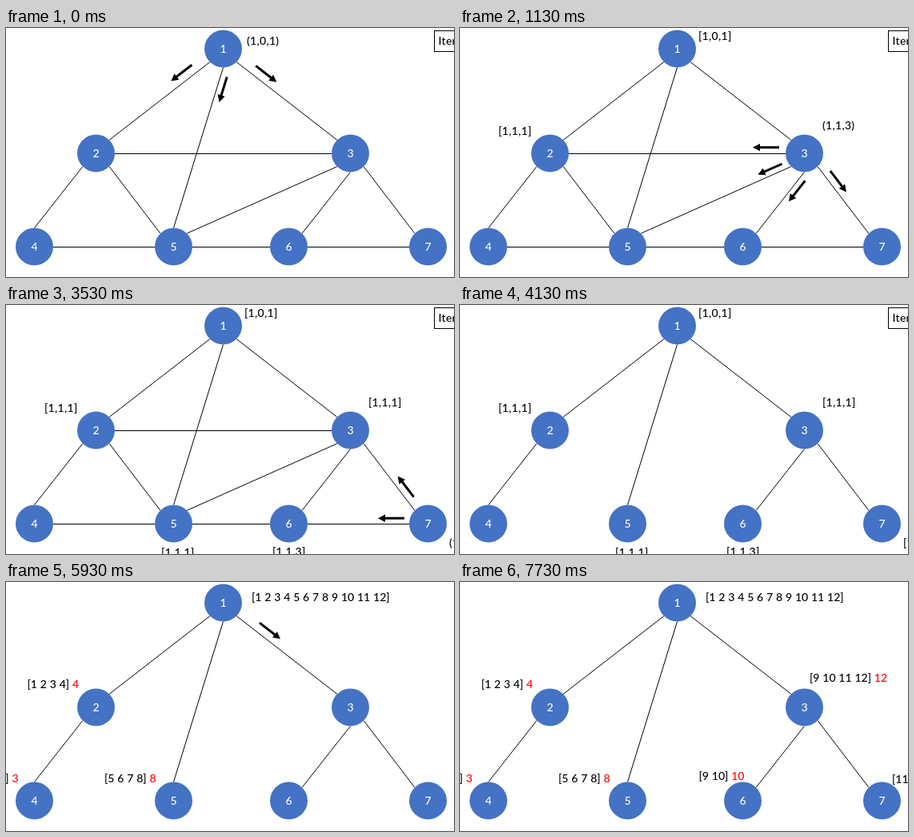
Recreate the animation shown at these times as an HTML page with a canvas. Size 560 by 312 pixels, loop 8.33 s.

```html
<!DOCTYPE html>
<html lang="en">
<head>
<meta charset="utf-8">
<title>Spanning tree numbering</title>
<style>
html, body { margin: 0; width: 100%; height: 100%; overflow: hidden; background: #fff; }
canvas { display: block; }
</style>
</head>
<body>
<canvas id="stage" width="560" height="312"></canvas>
<script>
const ctx = document.getElementById("stage").getContext("2d");
const LOOP = 8330, FIRST = 530, STEP = 600;
const TREE_STEP = 7, LIST_STEP = 8;
const BLUE = "#4472c4", RED = "#ff0000", RADIUS = 23.5;

// note: message offset, nudge: extra offset while active,
// range: numbers held, at: step they appear, tag: their offset
const nodes = [
  { id: 1, x: 271.5, y: 26, note: [26.5, -11], nudge: [3, 6], range: [1, 12], at: 8, tag: [35.5, -2] },
  { id: 2, x: 112.5, y: 157, parent: 1, note: [-64.5, -23], nudge: [6, 0], range: [1, 4], at: 9, tag: [-86, -24] },
  { id: 3, x: 430.5, y: 157, parent: 1, note: [22.5, -30], range: [9, 12], at: 11, tag: [6.5, -32] },
  { id: 4, x: 35.5, y: 274, parent: 2, note: [-78, -23], range: [1, 3], at: 10, tag: [-72.5, -23] },
  { id: 5, x: 209.5, y: 274, parent: 1, note: [-15.5, 41], range: [5, 8], at: 10, tag: [-86.5, -23] },
  { id: 6, x: 353.5, y: 274, parent: 3, note: [-20.5, 40], range: [9, 10], at: 13, tag: [-55, -26] },
  { id: 7, x: 527.5, y: 274, parent: 3, note: [26.5, 29], range: [11, 11], at: 13, tag: [12.5, -22] }
];

// Edges join compass points on the node rims
const compass = ["E", "SE", "S", "SW", "W", "NW", "N", "NE"];
const treeEdges = parseEdges("1SW-2NE 1S-5N 1SE-3NW 2SW-4N 3S-6NE 3SE-7NW");
const crossEdges = parseEdges("2E-3W 2SE-5NW 3SW-5NE 4E-5W 5E-6W 6E-7W");
const edges = [...treeEdges, ...crossEdges];

// Arrows per step: from>to, then + above or - below the edge and the gap to the rim
const arrows = [
  "1>2+20 1>5-10 1>3+22",
  "2>3+8 2>4+14 2>5+8",
  "3>2+8 3>5+9 3>6-8 3>7+14",
  "4>5+9",
  "5>2+5 5>3+4 5>4+7 5>6+7",
  "6>3+8 6>7+7",
  "7>3+14 7>6+6",
  "",
  "1>2+40",
  "2>4+14 1>5+36",
  "1>3+28",
  "",
  "3>6+18 3>7+14",
  ""
].map(parseArrows);

function rim(id, point) {
  const { x, y } = nodes[id - 1], angle = compass.indexOf(point) * Math.PI / 4;
  return { id, x: x + RADIUS * Math.cos(angle), y: y + RADIUS * Math.sin(angle) };
}

function parseEdges(spec) {
  return spec.split(" ").map(edge =>
    edge.split("-").map(end => rim(+end[0], end.slice(1))));
}

function parseArrows(spec) {
  return [...spec.matchAll(/(\d)>(\d)([+-])(\d+)/g)].map(([, from, to, side, gap]) => {
    const edge = edges.find(e => e.some(p => p.id === +from) && e.some(p => p.id === +to));
    const [a, b] = edge[0].id === +from ? edge : [edge[1], edge[0]];
    const angle = Math.atan2(b.y - a.y, b.x - a.x);
    const up = (Math.cos(angle) > 0 ? -1 : 1) * (side === "+" ? 1 : -1);
    return { ...a, angle, gap: +gap, lift: up * Math.min(11, 5 + gap * 0.3) };
  });
}

function line(x1, y1, x2, y2, width = 1) {
  ctx.lineWidth = width;
  ctx.beginPath();
  ctx.moveTo(x1, y1);
  ctx.lineTo(x2, y2);
  ctx.stroke();
}

function drawEdge([a, b]) {
  const snap = a.y === b.y || Math.abs(a.y - b.y) < 0.01 ? 0.5 : 0;
  line(a.x, a.y + snap, b.x, b.y + snap);
}

function drawArrow({ x, y, angle, gap, lift }) {
  const length = 33;
  ctx.save();
  ctx.translate(x, y);
  ctx.rotate(angle);
  ctx.translate(gap, lift);
  ctx.fillStyle = "#000";
  line(0, 0, length - 8, 0, 3);
  ctx.beginPath();
  ctx.moveTo(length, 0);
  ctx.lineTo(length - 9, -4.7);
  ctx.lineTo(length - 9, 4.7);
  ctx.fill();
  ctx.restore();
}

function text(str, x, y, color = "#000") {
  ctx.fillStyle = color;
  ctx.fillText(str, x, y);
}

function drawNode({ id, x, y }) {
  ctx.fillStyle = BLUE;
  ctx.beginPath();
  ctx.arc(x, y, RADIUS, 0, Math.PI * 2);
  ctx.fill();
  ctx.textAlign = "center";
  text(id, x, y + 5, "#fff");
  ctx.textAlign = "left";
}

// Each node in turn sends (1, distance, itself), then keeps [1, distance, parent]
function drawMessage({ id, x, y, parent, note, nudge = [0, 0] }, step) {
  const turn = id - 1, distance = parent ? 1 : 0;
  if (step < turn) return;
  const [tx, ty] = [x + note[0], y + note[1]];
  if (step === turn) text(`(1,${distance},${id})`, tx + nudge[0], ty + nudge[1]);
  else text(`[1,${distance},${parent || 1}]`, tx, ty);
}

function drawList({ x, y, parent, range: [first, last], at, tag }, step) {
  if (step < at) return;
  const numbers = Array.from({ length: last - first + 1 }, (_, i) => first + i);
  const list = `[${numbers.join(" ")}] `;
  const [tx, ty] = [x + tag[0], y + tag[1]];
  text(list, tx, ty);
  if (parent) text(last, tx + ctx.measureText(list).width, ty, RED);
}

function draw(now) {
  const t = now % LOOP;
  const step = t < FIRST ? 0 : 1 + Math.floor((t - FIRST) / STEP);
  ctx.fillStyle = "#fff";
  ctx.fillRect(0, 0, 560, 312);
  ctx.strokeStyle = "#000";
  ctx.font = "500 14px Lato, sans-serif";
  ctx.wordSpacing = "0.3px";
  ctx.letterSpacing = "0px";

  (step < TREE_STEP ? edges : treeEdges).forEach(drawEdge);
  nodes.forEach(drawNode);
  arrows[step].forEach(drawArrow);
  if (step >= LIST_STEP) {
    nodes.forEach(node => drawList(node, step));
    return;
  }
  ctx.letterSpacing = "0.3px";
  nodes.forEach(node => drawMessage(node, step));
  ctx.lineWidth = 1;
  ctx.strokeRect(535.5, 3.5, 80, 26);
  text("Iteration", 540.5, 21);
}

const start = performance.now();
function tick() {
  draw(performance.now() - start);
  requestAnimationFrame(tick);
}
tick();
</script>
</body>
</html>
```
